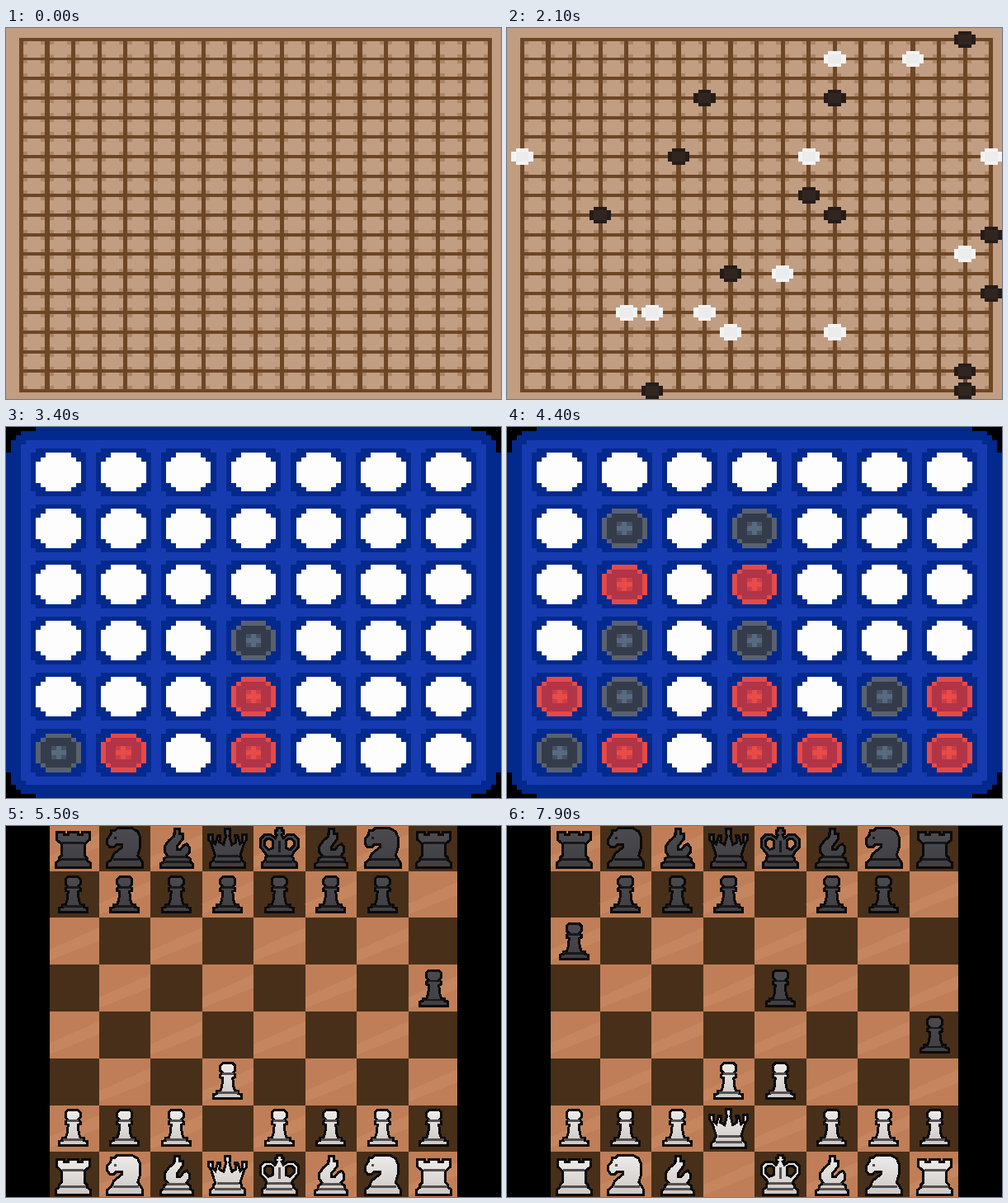
Write an HTML page that moves like this. It is 600 by 450 pixels and loops after 8000 ms.

```html
<!DOCTYPE html>
<html lang="en">
<head>
<meta charset="utf-8">
<title>Three board games</title>
<style>
html, body { margin: 0; width: 100%; height: 100%; overflow: hidden; background: #000; }
svg { display: block; width: 100vw; height: 100vh; }
</style>
</head>
<body>
<svg id="stage" viewBox="0 0 600 450" preserveAspectRatio="none" shape-rendering="crispEdges"></svg>
<script>
const LOOP = 8000, STEP = 100, TURNS_PER_STEP = 1.2;
const DROP_START = 36, CHESS_START = 66;
const stage = document.getElementById('stage');

const rect = (x, y, w, h, fill) => `<rect x="${x}" y="${y}" width="${w}" height="${h}" fill="${fill}"/>`;
const path = (d, fill, extra = '') => `<path d="${d}" fill="${fill}" ${extra}/>`;
const range = n => [...Array(n).keys()];

// Round pixel shape: one centred run of cells per row.
function blob(cx, cy, widths) {
  const top = cy - (widths.length - 1) / 2;
  return widths.map((w, i) => `M${cx - (w - 1) / 2} ${top + i}h${w}v1h${-w}z`).join('');
}

// ---- Go: 114 x 114 cells, one crossing every 6 ----
const BLACK = 'gg li mj im sn fs rs sk hd dj rr ra md is eq pf ge ik'.split(' ');
const WHITE = 'mb lg rl km fo ho ip pb sg mp eo ag bc qo oc ds pd'.split(' ');

function goScene() {
  let ticks = '', lines = '';
  for (const i of range(18)) for (const j of range(18))
    for (const dx of [4, 8]) for (const dy of [4, 8])
      ticks += `M${i * 6 + dx} ${j * 6 + dy}h1v1h-1z`;
  for (const i of range(19))
    lines += `M${i * 6 + 3} 3h1v109h-1zM3 ${i * 6 + 3}h109v1h-109z`;

  const stone = n => {
    const dark = n % 2 === 0;
    const [c, r] = [...(dark ? BLACK : WHITE)[n >> 1]].map(s => (s.charCodeAt(0) - 97) * 6 + 3);
    return `<g class="stone">${path(blob(c, r, [3, 5, 5, 5, 3]), dark ? '#261c19' : '#f4f3f3')}` +
      `${path(blob(c, r, [3, 3, 3]), dark ? '#31261f' : '#ececec')}</g>`;
  };
  return `<g id="go" transform="scale(${600 / 114} ${450 / 114})">` +
    rect(0, 0, 114, 114, '#c19d82') + path(ticks, '#a98467') + path(lines, '#6d4626') +
    range(BLACK.length + WHITE.length).map(stone).join('') + '</g>';
}

// ---- Four in a row: 99 x 86 cells, holes 13 apart ----
const DROPS = '30331' + '101351341656' + '224460055226';

function dropScene() {
  const hole = [5, 7, 9, 9, 9, 9, 9, 7, 5];
  const box = [9, ...Array(9).fill(11), 9];
  const centre = i => 10 + 13 * i;
  let frames = '', holes = '';
  for (const c of range(7)) for (const r of range(6)) {
    frames += blob(centre(c), centre(r), box);
    holes += blob(centre(c), centre(r), hole);
  }

  const fill = Array(7).fill(0);
  const discs = [...DROPS].map((s, n) => {
    const x = centre(+s), y = centre(5 - fill[s]++);
    const [rim, face, hub, dot] = n % 2 ? ['#59616f', '#343c4b', '#475165', '#566a80']
                                        : ['#e44a48', '#b13447', '#cf3e45', '#e84b48'];
    return `<g class="disc">${path(blob(x, y, hole), rim)}${path(blob(x, y, [5, 7, 7, 7, 7, 7, 5]), face)}` +
      `${path(blob(x, y, [3, 3, 3]), hub)}${path(blob(x, y, [1, 3, 1]), dot)}</g>`;
  }).join('');

  const corner = 'M0 0h6v1h-3v1h-1v1h-1v3h-1z';
  const corners = [[1, 1], [-1, 1], [1, -1], [-1, -1]].map(([sx, sy]) =>
    path(corner, '#000', `transform="translate(${sx < 0 ? 99 : 0} ${sy < 0 ? 86 : 0}) scale(${sx} ${sy})"`)).join('');

  return `<g id="drop" transform="scale(${600 / 99} ${450 / 86})">` +
    rect(0, 0, 99, 86, '#04298c') + path('M4 3h91v1h1v78h-1v1h-91v-1h-1v-78h1z', '#163bb0') + corners +
    path(frames, '#04298c') + path(holes, '#fdfdfd') + discs + '</g>';
}

// ---- Chess ----
const CELL_W = 62.5, CELL_H = 56.8, LEFT = 50, TOP = -2.3;

// Closed outline mirrored about x = 0, from its right half.
function mirror(text) {
  const right = text.split(' ').map(p => p.split(',').map(Number));
  const left = right.map(([x, y]) => [-x, y]).reverse();
  return 'M' + [...right, ...left].join('L') + 'Z';
}

const FOOT = '17,41 17,44 21,47 21,53 0,53';
const SHAPES = {
  p: mirror('0,7 6,7 9,10 9,16 6,19 9,21 9,24 6,25 7,35 9,41 13,41 13,44 17,45 17,50 0,50'),
  r: mirror('0,10 6,10 6,13 11,13 11,10 20,10 20,19 14,24 14,38 ' + FOOT),
  q: mirror('0,6 3,6 3,12 2,14 5,25 10,22 9,14 12,14 15,24 18,21 18,13 23,13 23,19 20,23 15,39 ' + FOOT),
  k: mirror('0,5 3,5 3,8 5,8 5,12 3,13 5,17 10,13 18,13 23,18 23,28 17,35 15,39 ' + FOOT) +
     'M8 20L11 18H15L18 21V26L13 31L8 29ZM-8 20L-11 18H-15L-18 21V26L-13 31L-8 29Z',
  b: 'M-2 6H4V12H8V18L1 27V31H5L9 26L13 24L16 28V34L12 39L17 42V46L20 48V53H-19V48L-15 46V42L-10 39L-14 34V27L-9 20L-3 15V12H-2Z',
  n: 'M-16 8H-12L-9 5H9L16 9L19 16V28L16 38L19 42L22 47V53H-21V47L-16 43L-13 36L-3 28V25L-10 25L-13 28H-18L-21 24V18L-17 13Z'
};
const DETAIL = {
  p: 'M-7 20H7M-12 43H12', r: 'M-13 23H13M-16 43H16', q: 'M-13 39H13M-16 46H16',
  k: 'M0 20V34M-14 39H14M-16 46H16', b: 'M-11 40H12M-15 46H16', n: 'M-13 17H-10M-14 43H17'
};

const pieces = [];
[...'rnbqkbnr'].forEach((kind, col) => {
  pieces.push({ kind, col, row: 0 }, { kind: 'p', col, row: 1 },
              { kind: 'p', col, row: 6, white: true }, { kind, col, row: 7, white: true });
});
// [turn, from column, from row, to row]; no move leaves its file.
const MOVES = [[0, 3, 6, 5], [0, 7, 1, 3], [5, 4, 1, 3], [10, 4, 6, 5], [15, 7, 3, 4], [19, 3, 7, 6], [24, 0, 1, 2]];

function chessScene() {
  let squares = '';
  for (const r of range(8)) for (const c of range(8)) {
    const x = LEFT + c * CELL_W, y = TOP + r * CELL_H;
    if ((r + c) % 2) squares += rect(x, y, CELL_W, CELL_H, '#482f19');
    else squares += rect(x, y, CELL_W, CELL_H, '#bf7e57') +
      path(`M${x} ${y + 40}L${x + CELL_W} ${y + 12}v16L${x} ${y + 53}z`, '#cd926b', 'opacity=".4"');
  }
  const men = pieces.map(({ kind, white }) => `<g class="man">` +
    path(SHAPES[kind], `url(#${white ? 'ivory' : 'ebony'})`, 'fill-rule="evenodd" stroke="#0b0a0c" stroke-width="3"') +
    path(DETAIL[kind], 'none', `stroke="${white ? '#55504f' : '#18171a'}" stroke-width="2.5"`) + '</g>').join('');
  const shade = (id, a, b) => `<linearGradient id="${id}" x2="0" y2="1"><stop stop-color="${a}"/>` +
    `<stop offset="1" stop-color="${b}"/></linearGradient>`;
  return `<g id="chess"><defs>${shade('ivory', '#eeecea', '#cbc7c5')}${shade('ebony', '#4b4a4e', '#3f3e42')}</defs>` +
    squares + rect(0, 0, 53, 450, '#000') + rect(547, 0, 53, 450, '#000') + men + '</g>';
}

stage.innerHTML = goScene() + dropScene() + chessScene();
const scenes = ['go', 'drop', 'chess'].map(id => document.getElementById(id));
const [stones, discs, men] = ['stone', 'disc', 'man'].map(name => [...stage.querySelectorAll('.' + name)]);

const show = (el, on) => el.setAttribute('display', on ? 'inline' : 'none');
const showFirst = (list, n) => list.forEach((el, i) => show(el, i < n));

function placeMen(turn) {
  const rows = pieces.map(p => p.row);
  for (const [at, col, from, to] of MOVES) {
    if (turn < at) break;
    rows[pieces.findIndex((p, i) => p.col === col && rows[i] === from)] = to;
  }
  men.forEach((el, i) => {
    const x = LEFT + (pieces[i].col + 0.5) * CELL_W;
    const y = TOP + rows[i] * CELL_H - (pieces[i].white ? 1 : 0);
    el.setAttribute('transform', `translate(${x} ${y})`);
  });
}

let shown = -1;
function render(time) {
  const turn = Math.round(Math.floor((time % LOOP) / STEP) * TURNS_PER_STEP);
  if (turn === shown) return;
  shown = turn;
  const scene = turn < DROP_START ? 0 : turn < CHESS_START ? 1 : 2;
  scenes.forEach((el, i) => show(el, i === scene));
  if (scene === 0) showFirst(stones, turn);
  else if (scene === 1) showFirst(discs, turn - DROP_START);
  else placeMen(turn - CHESS_START);
}

const start = performance.now();
function tick() {
  render(performance.now() - start);
  requestAnimationFrame(tick);
}
tick();
</script>
</body>
</html>
```
